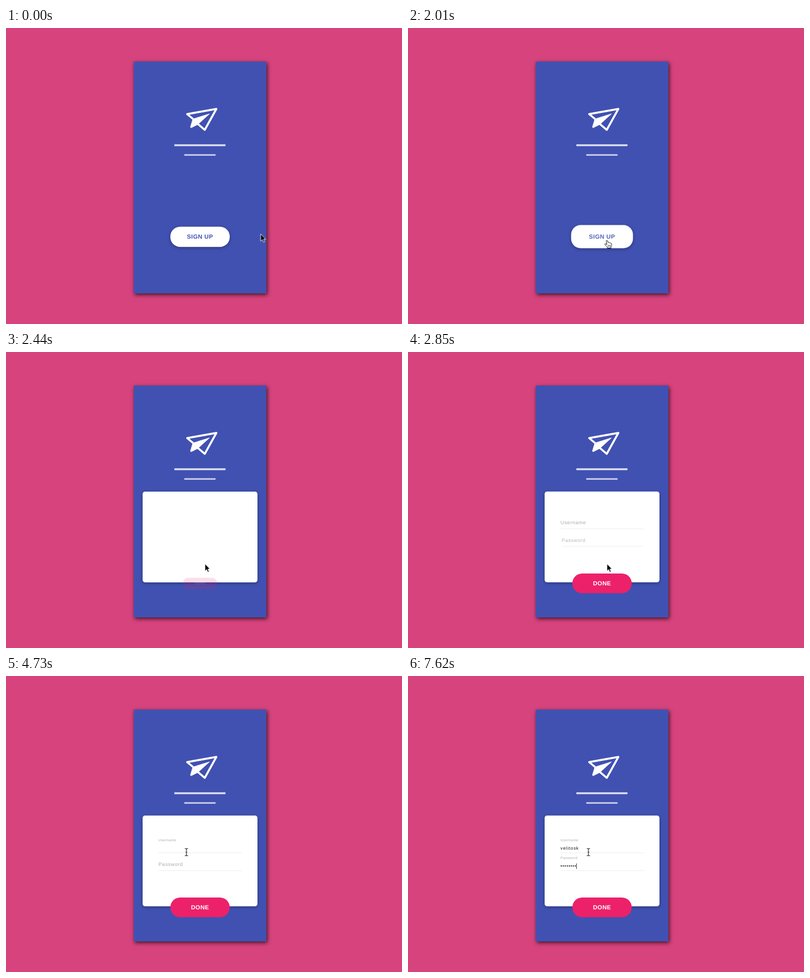
Animation, 800 px wide and 600 px high, one loop 8000 ms. Source, as an HTML page:

```html
<!DOCTYPE html>
<html lang="en">
<head>
<meta charset="utf-8">
<title>Sign up</title>
<style>
  html, body { margin: 0; width: 100%; height: 100%; overflow: hidden; background: #d7437d; }
  body { position: relative; font-family: "Liberation Sans", Arial, sans-serif; text-rendering: geometricPrecision; font-kerning: none; }
  div, span, svg { position: absolute; }
  .anim { animation: 8s linear infinite; }

  .phone { left: 258px; top: 68px; width: 267.5px; height: 469.5px; background: #4151b2; box-shadow: 2px 3px 8px rgba(0, 0, 0, .7); }
  svg { left: 0; top: 0; }

  .button { left: 332px; top: 403px; width: 120px; height: 40px; line-height: 41px; text-align: center; font-size: 12px; font-weight: bold; letter-spacing: .5px; }
  .signup { color: #4151b2; animation-name: signup; }
  .done { top: 449px; border-radius: 20px; background: #ec2169; color: #fff; animation-name: done; }

  .lift { left: 392px; top: 423.2px; animation-name: lift; }
  .card { background: #fff; box-shadow: 0 2px 7px rgba(0, 0, 0, .32); transform: translate(-50%, -50%); animation-name: grow; }

  .field { left: 308px; top: 340.5px; width: 169px; height: 18px; transform-origin: 84px 34.5px; }
  .field + .field { top: 376.5px; transform-origin: 84px -1.5px; }
  .field::after { content: ""; position: absolute; left: 0; top: 17.3px; width: 100%; height: 1px; background: #ececec; }
  .label { left: 0; top: 0; font-size: 10px; line-height: 12px; letter-spacing: .7px; color: #a9a9a9; transform-origin: 0 0; }
  .typed { left: 0; top: 3px; height: 11px; overflow: hidden; white-space: nowrap; font-size: 9px; line-height: 11px; letter-spacing: .9px; color: #111; border-right: 1px solid transparent; animation-timing-function: step-end; }
  .user { animation-name: user; }
  .pass { animation-name: pass; }
  .user .label { animation-name: userLabel; }
  .pass .label { animation-name: passLabel; }
  .user .typed { animation-name: userType; }
  .pass .typed { animation-name: passType; }

  .cursor { animation-name: move; }
  .arrow, .hand, .beam { animation-timing-function: step-end; }
  .arrow { animation-name: arrow; }
  .hand { animation-name: hand; }
  .beam { animation-name: beam; }

  @keyframes signup { 0%, 25% { opacity: 1; } 26.4%, 100% { opacity: 0; } }
  @keyframes lift {
    0%, 24.9% { transform: none; animation-timing-function: ease-in-out; }
    30.75%, 100% { transform: translateY(-48.2px); }
  }
  @keyframes grow {
    0%, 24.9% { width: 120px; height: 40.5px; border-radius: 20px; animation-timing-function: ease; }
    28.75%, 100% { width: 232px; height: 184px; border-radius: 5px; }
  }
  @keyframes done {
    0%, 30% { opacity: 0; transform: scale(.5); animation-timing-function: ease-out; }
    35.3%, 100% { opacity: 1; transform: none; }
  }
  @keyframes user {
    0%, 30.6% { opacity: 0; transform: scale(.8); animation-timing-function: ease-out; }
    35.3%, 100% { opacity: 1; transform: none; }
  }
  @keyframes pass {
    0%, 32.5% { opacity: 0; transform: scale(.8); animation-timing-function: ease-out; }
    37.125%, 100% { opacity: 1; transform: none; }
  }
  @keyframes userLabel {
    0%, 53.125% { transform: none; animation-timing-function: ease; }
    56.875%, 100% { transform: translateY(-11.6px) scale(.7); }
  }
  @keyframes passLabel {
    0%, 79.75% { transform: none; animation-timing-function: ease; }
    83.5%, 100% { transform: translateY(-11.6px) scale(.7); }
  }
  @keyframes userType {
    0% { width: 0; border-color: transparent; }
    53.625% { width: 0; border-color: #222; }
    59.125% { width: 0; border-color: transparent; }
    60.25% { width: 5.4px; border-color: #222; }
    61% { width: 11.3px; }
    63.25% { width: 14.2px; }
    64% { width: 17.1px; }
    67% { width: 20.5px; }
    71.5% { width: 26.4px; }
    72.875% { width: 31.8px; border-color: #222; }
    75.875% { width: 37.2px; border-color: #222; }
    80.375%, 100% { width: 37.2px; border-color: transparent; }
  }
  @keyframes passType {
    0% { width: 0; border-color: transparent; }
    80.375% { width: 0; border-color: #222; }
    84.375% { width: 4.05px; }
    86.25% { width: 8.1px; }
    87.75% { width: 12.15px; }
    90% { width: 16.2px; }
    92.25% { width: 20.25px; }
    93.25% { width: 24.3px; }
    94.25% { width: 28.35px; }
    95.25%, 100% { width: 32.4px; border-color: #222; }
  }
  @keyframes move {
    0%, .74% { transform: translate(514.5px, 417.5px); }
    .75% { transform: translate(496px, 429px); }
    2.1%, 6% { transform: translate(479px, 438.5px); }
    7.75% { transform: translate(466px, 447px); }
    9.5% { transform: translate(446px, 454px); }
    11.25% { transform: translate(423px, 447px); animation-timing-function: ease-out; }
    13.25%, 42% { transform: translate(402px, 429.5px); animation-timing-function: ease-in; }
    47% { transform: translate(381px, 385px); animation-timing-function: ease-out; }
    50.75%, 100% { transform: translate(364.5px, 357px); }
  }
  @keyframes arrow { 0% { opacity: 1; } 12% { opacity: 0; } 26.125% { opacity: 1; } 46%, 100% { opacity: 0; } }
  @keyframes hand { 0% { opacity: 0; } 12% { opacity: 1; } 26.125%, 100% { opacity: 0; } }
  @keyframes beam { 0% { opacity: 0; } 46%, 100% { opacity: 1; } }
</style>
</head>
<body>
  <div class="phone"></div>

  <svg width="800" height="600" fill="#fff">
    <path d="M378 184.5 366 174.5 425 164 401.5 206.5 387 194" fill="none" stroke="#fff" stroke-width="4" stroke-linejoin="round"/>
    <path d="M377.5 184.5 411 174 387.5 195.5 374 202.3 372.5 201Z" stroke="#fff" stroke-linejoin="round"/>
    <rect x="340" y="235.8" width="103.5" height="3.8" rx="1" opacity=".82"/>
    <rect x="360" y="255.8" width="63.5" height="3.2" rx="1" opacity=".7"/>
  </svg>

  <div class="lift anim"><div class="card anim"></div></div>
  <div class="button signup anim">SIGN UP</div>

  <div class="field user anim">
    <span class="typed anim">velitosk</span>
    <span class="label anim">Username</span>
  </div>
  <div class="field pass anim">
    <span class="typed anim">••••••••</span>
    <span class="label anim">Password</span>
  </div>
  <div class="button done anim">DONE</div>

  <svg width="800" height="600">
    <g class="cursor anim">
      <path class="arrow anim" d="M0 0V14.6L3.4 11.5 5.8 16.8 8.2 15.8 5.9 10.6H10.2Z" stroke="#fff"/>
      <g class="hand anim" fill="#fff" stroke="#000" stroke-linejoin="round">
        <path d="M-1.6 2C-1.2.4.8.4 1.2 2L2.4 5.6C3 4.8 4.8 5 5 6.2 5.8 5.4 7.3 5.8 7.5 7 8.4 6.5 9.5 7 9.5 8.2 9.7 11 9 12.5 8 14V16.5H.8V14.8C-1 13-2.5 11.4-4.4 9.2-4.8 7.8-3.4 7-2.2 8.2L-.2 9.6Z"/>
        <path d="M2.3 10.5V13.5M4.4 10.5V13.5M6.5 10.5V13.5" stroke-width=".9"/>
      </g>
      <g class="beam anim" fill="none">
        <path id="ibeam" d="M-3.2-7.5Q0-7.5 0-5.4 0-7.5 3.2-7.5M0-5.4V5.4M-3.2 7.5Q0 7.5 0 5.4 0 7.5 3.2 7.5M-1.6 0H1.6" stroke="#111" stroke-width="1.2"/>
      </g>
    </g>
  </svg>
</body>
</html>
```
